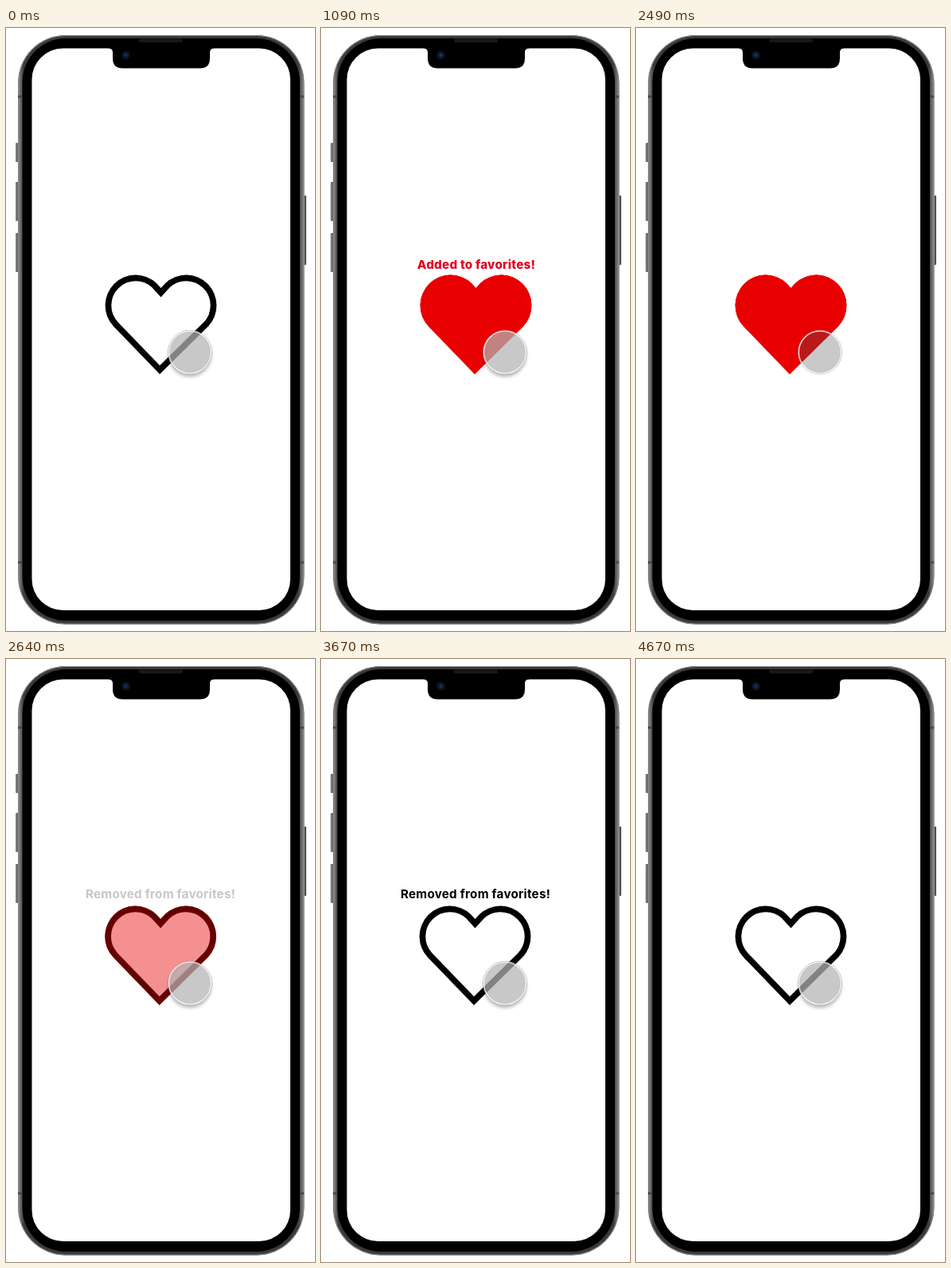
An HTML page that plays this animation: 388x756 px, repeating every 4.85 s.

```html
<!DOCTYPE html>
<html lang="en">
<head>
<meta charset="utf-8">
<title>Favorite toggle</title>
<style>
  html, body { margin: 0; width: 100%; height: 100%; overflow: hidden; background: #fff; }
  svg { display: block; width: 100vw; height: 100vh; }
  text { font-family: Inter, "Open Sans", sans-serif; font-size: 15.2px; text-anchor: middle; letter-spacing: .25px; }
</style>
</head>
<body>
<svg viewBox="0 0 388 756">
  <defs>
    <path id="shape" d="M193 434L135 374A38.2 38.2 0 0 1 189 320L194.5 326L200 320A38.2 38.2 0 0 1 254 374Z"/>
    <clipPath id="inside"><use href="#shape"/></clipPath>
    <linearGradient id="metal" x1="0" x2="1" y1="0" y2="0">
      <stop offset="0" stop-color="#999"/>
      <stop offset=".008" stop-color="#6d6d6b"/>
      <stop offset=".02" stop-color="#3a3a3a"/>
      <stop offset=".98" stop-color="#3a3a3a"/>
      <stop offset=".992" stop-color="#6d6d6b"/>
      <stop offset="1" stop-color="#999"/>
    </linearGradient>
    <linearGradient id="key" x1="0" x2="1" y1="0" y2="0">
      <stop offset="0" stop-color="#8a8a8a"/>
      <stop offset="1" stop-color="#444"/>
    </linearGradient>
    <radialGradient id="lens">
      <stop offset="0" stop-color="#1c3d6e"/>
      <stop offset=".5" stop-color="#0c1a33"/>
      <stop offset="1" stop-color="#0a0c12"/>
    </radialGradient>
    <filter id="soft" x="-30%" y="-30%" width="160%" height="160%"><feGaussianBlur stdDeviation="2"/></filter>
    <mask id="outside" maskUnits="userSpaceOnUse" x="190" y="365" width="82" height="90">
      <path fill="#fff" d="M190 365h82v90h-82z"/>
      <circle cx="231" cy="406.5" r="27"/>
    </mask>
  </defs>

  <!-- phone -->
  <g fill="url(#key)">
    <rect x="12" y="144" width="5" height="24" rx="1"/>
    <rect x="12" y="193" width="5" height="49" rx="1"/>
    <rect x="12" y="257" width="5" height="49" rx="1"/>
    <rect x="372" y="210" width="5" height="87" rx="1"/>
  </g>
  <rect x="15" y="9" width="359.5" height="738.5" rx="60" fill="url(#metal)"/>
  <rect x="15.5" y="9.5" width="358.5" height="737.5" rx="59.5" fill="none" stroke="#858583"/>
  <path d="M15 86h6M368 86h6M15 670h6M368 670h6" stroke="#4b4b4b" stroke-width="3"/>
  <rect x="20.5" y="13" width="348.5" height="730" rx="55"/>
  <rect x="32.5" y="25.5" width="324.5" height="704.5" rx="39" fill="#fff"/>
  <path d="M129 24H261V25.5Q256 25.5 256 31V38Q256 50.5 243.5 50.5H146.5Q134 50.5 134 38V31Q134 25.5 129 25.5Z"/>
  <rect x="167" y="13.5" width="55" height="4.5" rx="2" fill="#191919"/>
  <circle cx="150.5" cy="34" r="5.5" fill="url(#lens)"/>

  <!-- heart -->
  <g id="heart">
    <use id="fill" href="#shape" fill="#e80000"/>
    <g clip-path="url(#inside)">
      <use id="line" href="#shape" fill="none" stroke-width="15.4" stroke-miterlimit="8"/>
    </g>
  </g>
  <text id="added" x="195" y="301.6" font-weight="800" fill="#e30022">Added to favorites!</text>
  <text id="removed" x="194" y="299.6" font-weight="700" fill="#000">Removed from favorites!</text>

  <!-- touch point -->
  <g id="shadow" mask="url(#outside)">
    <circle cx="231" cy="410.5" r="27" opacity=".27" filter="url(#soft)"/>
  </g>
  <circle cx="231" cy="406.5" r="27.4" fill="none" stroke="#a8a8a8" stroke-width=".8"/>
  <circle id="dot" cx="231" cy="406.5" r="26.5"/>
  <circle cx="231" cy="406.5" r="26.5" fill="none" stroke="#fff" stroke-width="1.1" stroke-opacity=".9"/>
</svg>
<script>
const LOOP = 4850;
const $ = id => document.getElementById(id);
const [heart, fill, line, added, removed, shadow, dot] =
  ["heart", "fill", "line", "added", "removed", "shadow", "dot"].map($);

const ramp = (t, a, b) => Math.min(1, Math.max(0, (t - a) / (b - a)));
const easeOut = (t, a, b) => 1 - (1 - ramp(t, a, b)) ** 1.7;
const within = (t, a, b) => t >= a && t < b;

function draw(t) {
  const red = easeOut(t, 630, 910) - easeOut(t, 2540, 2800);
  const yes = easeOut(t, 630, 940) - easeOut(t, 1610, 2090);
  const no = ramp(t, 2540, 3000) - easeOut(t, 3940, 4390);
  const shift = ramp(t, 2540, 2800) - ramp(t, 3940, 4200);
  const pressed = within(t, 580, 640) || within(t, 2490, 2550);

  fill.setAttribute("opacity", red);
  line.setAttribute("stroke", `rgb(${Math.round(232 * red)},0,0)`);
  heart.setAttribute("transform", `translate(${-shift} 0)`);
  added.setAttribute("opacity", yes);
  removed.setAttribute("opacity", no);
  shadow.setAttribute("opacity", pressed ? 0 : 1);
  dot.setAttribute("fill", pressed ? "#505050" : "#b4b4b4");
  dot.setAttribute("fill-opacity", pressed ? .31 : .725);
}

const start = performance.now();
function tick() {
  draw((performance.now() - start) % LOOP);
  requestAnimationFrame(tick);
}
tick();
</script>
</body>
</html>
```
